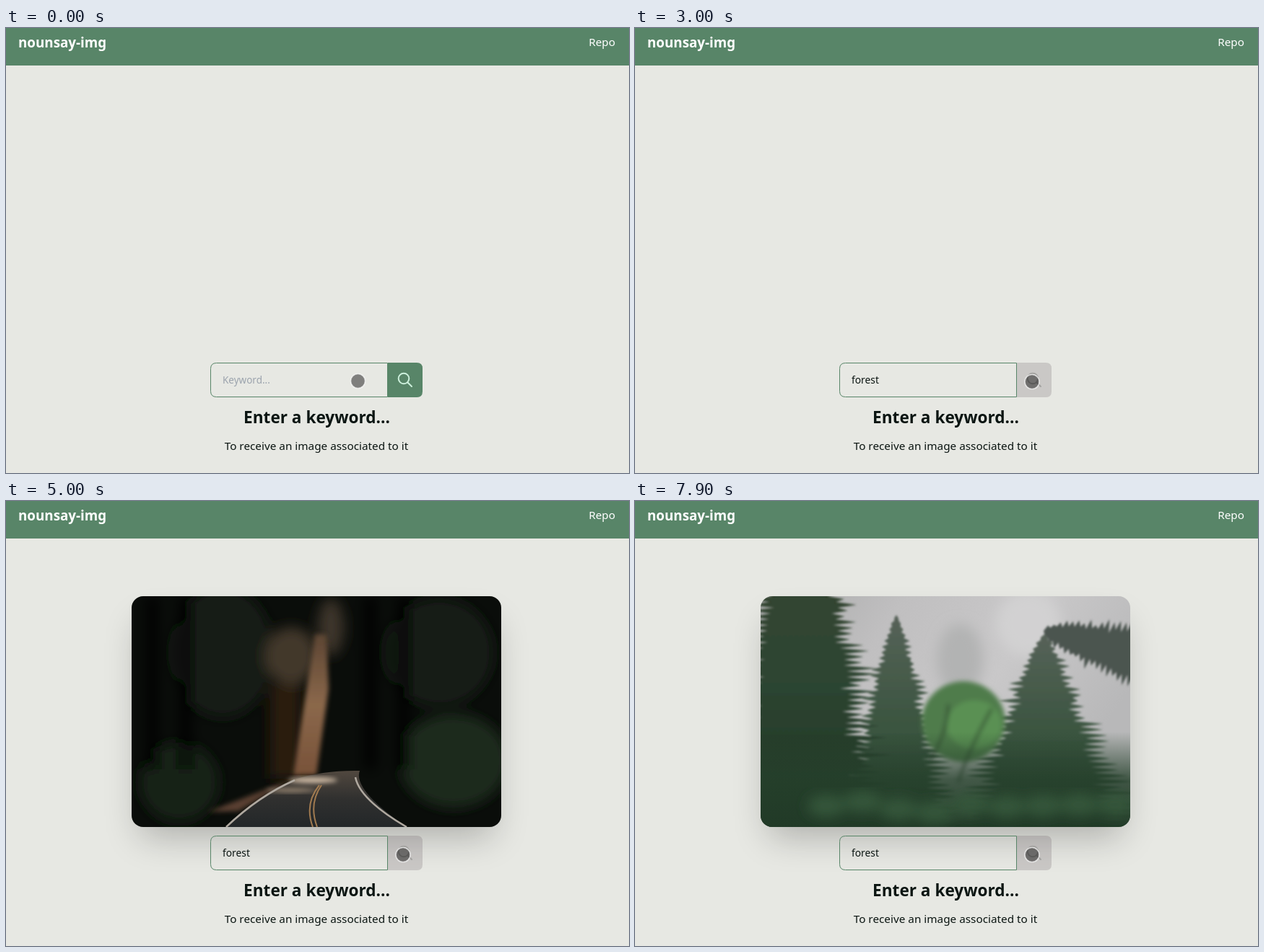
Animation of 863x617 px, one loop 8000 ms. Source, as an HTML page:

```html
<!DOCTYPE html>
<html lang="en">
<head>
<meta charset="utf-8">
<title>Image search</title>
<style>
  html, body { margin: 0; width: 100%; height: 100%; overflow: hidden; background: #e7e8e3; }
  svg { display: block; width: 863px; height: 617px; font-family: "Noto Sans", "Open Sans", sans-serif; fill: #0b1512; }
</style>
</head>
<body>
<svg id="stage" viewBox="0 0 863 617" xmlns="http://www.w3.org/2000/svg"></svg>
<script>
const LOOP = 8000, STEP = 100;
const GREEN = '#588568';
const PHOTO = { left: 174, top: 132, right: 686, bottom: 452 };
const stage = document.getElementById('stage');

let seed = 7;
const random = () => (seed = (seed * 16807) % 2147483647) / 2147483647;
const repeat = (count, make) => Array.from({ length: count }, (_, i) => make(i)).join('');

const box = (fill, x, y, w, h, extra = '') =>
  `<rect fill="${fill}" x="${x}" y="${y}" width="${w}" height="${h}" ${extra}/>`;
const blob = (fill, x, y, rx, ry = rx) =>
  `<ellipse fill="${fill}" cx="${x}" cy="${y}" rx="${rx}" ry="${ry}"/>`;
const line = (color, width, d) => `<path fill="none" stroke="${color}" stroke-width="${width}" d="${d}"/>`;
const fillPhoto = fill => box(fill, PHOTO.left, PHOTO.top, 512, 320);
const gradient = (id, direction, ...colors) => `<linearGradient id="${id}" ${direction}>${
  colors.map((c, i) => `<stop offset="${i / (colors.length - 1)}" stop-color="${c}"/>`).join('')
}</linearGradient>`;
const blurFilter = (id, size) => `<filter id="${id}"><feGaussianBlur stdDeviation="${size}"/></filter>`;
const leftRounded = (x, y, right, bottom, r) =>
  `M${right} ${y}H${x + r}Q${x} ${y} ${x} ${y + r}V${bottom - r}Q${x} ${bottom} ${x + r} ${bottom}H${right}Z`;

// A conifer outline: ragged tips that widen from the top to the foot.
function fir(fill, x, top, half, taper = 0.8, foot = PHOTO.bottom + 8) {
  const rows = Math.round((foot - top) / 8);
  const side = dir => Array.from({ length: rows * 2 }, (_, i) => {
    const reach = half * (i / rows / 2) ** taper * (i % 2 ? 0.9 + random() * 0.4 : 0.6 + random() * 0.2);
    return [x + dir * reach, top + i * 4];
  });
  return `<polygon fill="${fill}" points="${[...side(1), ...side(-1).reverse()].join(' ')}"/>`;
}

const darkWoods = `
  ${fillPhoto('#0a0d0a')}
  <g filter="url(#soft)">
    ${blob('#141c15', 300, 210, 70, 90)}
    ${blob('#151d16', 600, 210, 75)}
    ${blob('#182119', 240, 390, 55)}
    ${blob('#1a2a1c', 620, 360, 75, 65)}
    ${blob('#42382b', 395, 215, 36, 40)}
    ${blob('#3d3529', 450, 175, 18, 40)}
    ${box('#2a1a11', 366, 255, 42, 130)}
    ${repeat(4, i => box('#030403', 195 + i * 46 + (i > 1) * 210, 132, 15, 240))}
  </g>
  <g filter="url(#edge)">
    <path fill="url(#beam)" d="M428 185H444L447 260L430 380H398Z"/>
    <path fill="#5a4130" d="M280 431L400 384L322 430Z"/>
  </g>
  <path fill="url(#asphalt)" d="M305 452Q352 407 400 386Q440 373 490 374Q480 400 555 452Z"/>
  <g filter="url(#edge)">${blob('#d0bca6', 425, 387, 34, 4)}${blob('#94836f', 395, 401, 34, 3)}</g>
  ${line('#b0a9a0', 2.5, 'M305 452Q350 409 400 387M484 383Q490 414 555 452')}
  ${repeat(2, i => line('#a07a50', 2, `M${425 + i * 6} 452Q${413 + i * 6} 420 ${434 + i * 3} 394`))}`;

const mistyWoods = `
  ${fillPhoto('url(#sky)')}
  <g filter="url(#soft)">${blob('#b2b3b3', 450, 220, 32, 50)}${blob('#d2d1d2', 545, 170, 45)}</g>
  <g filter="url(#leaf)">
    <g transform="rotate(-75 566 180)">${fir('#4c554f', 566, 180, 42, 0.5, 320)}</g>
    ${fir('url(#far)', 362, 158, 82)}
    ${fir('url(#far)', 567, 185, 120)}
    ${fir('url(#near)', 232, 60, 112, 0.4)}
  </g>
  <g filter="url(#edge)">
    ${blob('#4f7c4b', 455, 306, 58, 56)}
    ${blob('#5a9053', 470, 310, 38, 34)}
    ${line('#2a402c', 3, 'M408 360Q432 325 434 282M448 390Q462 345 494 288')}
  </g>
  ${box('url(#undergrowth)', PHOTO.left, 320, 512, 132)}
  <g filter="url(#soft)">${repeat(9, i => blob('#35573a', 265 + i * 50, 432 - random() * 16, 26, 15))}</g>`;

const buttonShape = 'M529 464H569Q577 464 577 472V504Q577 512 569 512H529Z';

stage.innerHTML = `
  <defs>
    <clipPath id="frame"><rect x="174" y="132" width="512" height="320" rx="16"/></clipPath>
    ${blurFilter('soft', 9)}
    ${blurFilter('edge', 3)}
    ${blurFilter('leaf', 1.5)}
    <filter id="drop" filterUnits="userSpaceOnUse" x="90" y="70" width="690" height="500">
      <feGaussianBlur stdDeviation="25"/>
    </filter>
    ${gradient('beam', 'x2="0" y2="1"', '#5c4533', '#8b684b', '#785239')}
    ${gradient('asphalt', 'x2="0" y2="1"', '#51483f', '#30302f', '#232729')}
    ${gradient('sky', 'x2="1" y2=".4"', '#a8a9a9', '#c0bfc0', '#c9c8c9', '#b8b8b9')}
    ${gradient('far', 'x2="0" y2="1"', '#566258', '#3b5540', '#2a4330')}
    ${gradient('near', 'x2="0" y2="1"', '#35432f', '#2c4430', '#1f3324')}
    ${gradient('undergrowth', 'x2="0" y2="1"', '#25402b00', '#25402bd0', '#213a27')}
  </defs>
  ${box('#e7e8e3', 0, 0, 863, 617)}
  ${box(GREEN, 0, 0, 863, 52)}
  <text x="17" y="26.5" font-size="18.8" font-weight="700" fill="#fff">nounsay-img</text>
  <text x="844" y="25" font-size="15.3" fill="#fff" text-anchor="end">Repo</text>

  <g id="card">
    ${box('#000', 186, 169, 488, 296, 'rx="4" opacity=".25" filter="url(#drop)"')}
    <g clip-path="url(#frame)">
      <g id="dark">${darkWoods}</g>
      <g id="misty">${mistyWoods}</g>
    </g>
  </g>

  <path id="ring" d="${leftRounded(280, 461, 532, 515, 11)}" fill="none" stroke="${GREEN}" stroke-width="2"/>
  <path d="${leftRounded(283.5, 464.5, 528.5, 511.5, 8)}" fill="none" stroke="${GREEN}"/>
  <text id="hint" x="300" y="493" font-size="13.5" fill="#9ba3ad">Keyword...</text>
  <text id="typed" x="300" y="493" font-size="13.8"></text>
  <rect id="caret" y="480" width="1" height="16" fill="#000"/>

  <g id="button">
    <path id="active" d="${buttonShape}" fill="${GREEN}"/>
    <path id="muted" d="${buttonShape}" fill="#564852"/>
    <g id="icon" fill="none" stroke-width="2" stroke-linecap="round">
      <circle cx="551" cy="486" r="7.3"/><path d="M556.5 491.5L562 497"/>
    </g>
  </g>

  <text x="430.5" y="548" font-size="22.6" font-weight="700" text-anchor="middle">Enter a keyword...</text>
  <text x="430" y="585" font-size="15.3" text-anchor="middle">To receive an image associated to it</text>
  <circle id="cursor" r="10" fill="#000" fill-opacity=".45" stroke="#fff" stroke-opacity=".65" stroke-width="1.6"/>`;

const el = Object.fromEntries([...stage.querySelectorAll('[id]')].map(node => [node.id, node]));
const show = (node, on) => node.setAttribute('visibility', on ? 'inherit' : 'hidden');
const progress = (t, from, duration) => Math.max(0, Math.min(1, (t - from) / duration));

const WORD = 'forest';
const KEY_TIMES = [1000, 1200, 1300, 1400, 1600, 1800];
const FOCUS = 500, MOVE = 2300, CLICK = 2800, FIRST_PHOTO = 3900, SECOND_CLICK = 4800, SECOND_PHOTO = 5900;

function draw(t) {
  const typed = WORD.slice(0, KEY_TIMES.filter(k => k <= t).length);
  const focused = t >= FOCUS && t < CLICK;
  show(el.ring, focused);
  show(el.caret, focused);
  show(el.hint, !typed);
  el.typed.textContent = typed;
  el.caret.setAttribute('x', Math.round(300 + (typed ? el.typed.getComputedTextLength() : 0)));

  const fade = progress(t, MOVE + 100, 300);
  el.active.setAttribute('opacity', 1 - fade);
  el.muted.setAttribute('opacity', 0.2 * fade);
  el.icon.setAttribute('stroke', fade < 0.5 ? '#cdf0dc' : '#a3a2a0');
  const click = t >= SECOND_CLICK ? SECOND_CLICK : CLICK;
  const scale = t < click ? 1 : 0.97 + 0.03 * progress(t, click, 200);
  el.button.setAttribute('transform', `translate(553 488) scale(${scale}) translate(-553 -488)`);

  show(el.card, t >= FIRST_PHOTO);
  show(el.dark, t >= FIRST_PHOTO && t < SECOND_PHOTO);
  show(el.misty, t >= SECOND_PHOTO);
  const blur = 1.5 * (1 - progress(t, FIRST_PHOTO, 300));
  el.dark.style.filter = blur ? `blur(${blur}px)` : 'none';

  // The pointer eases out to the button along a shallow arc.
  const moved = 1 - (1 - progress(t, MOVE, 425)) ** 2;
  el.cursor.setAttribute('cx', 487.5 + 62.5 * moved);
  el.cursor.setAttribute('cy', 489.5 + moved + 3.7 * Math.sin(Math.PI * moved));
}

const start = performance.now();
function tick() {
  const t = (performance.now() - start) % LOOP;
  draw(Math.floor(t / STEP) * STEP);
  requestAnimationFrame(tick);
}
tick();
</script>
</body>
</html>
```
